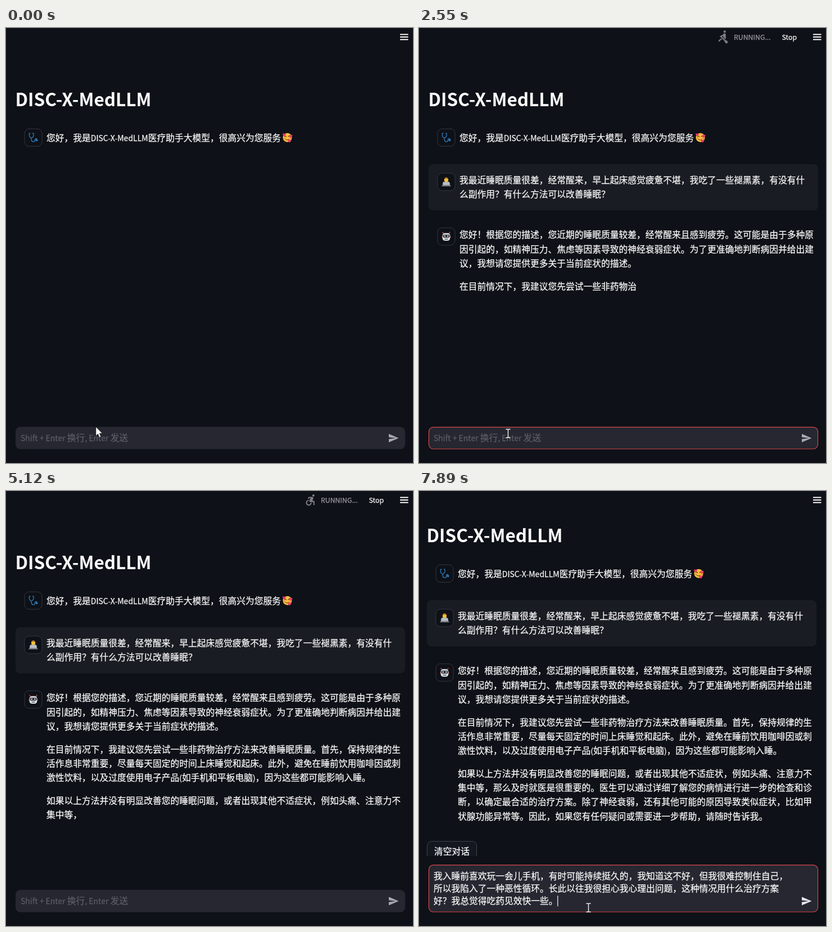
Recreate the animation shown at these times as an HTML page. Size 724 by 773 pixels, loop 8000 ms.

```html
<!DOCTYPE html>
<html lang="zh-CN">
<head>
<meta charset="utf-8">
<title>DISC-X-MedLLM</title>
<style>
  html, body { margin: 0; width: 100%; height: 100%; overflow: hidden; background: #0e1117; }
  svg { display: block; }
  text {
    font: 15.75px "Noto Sans CJK SC", "Noto Sans CJK", sans-serif;
    color: #fafafa; fill: currentColor; stroke: currentColor; stroke-width: .25;
    white-space: pre; text-spacing-trim: space-all; text-autospace: no-autospace;
  }
  .latin { font-size: .889em; }
  .title { font-size: 31.6px; font-weight: 700; stroke: none; }
  .small { font-size: 12.3px; }
  .avatar { fill: #0e1117; stroke: #343740; }
  .line { fill: none; stroke-linecap: round; stroke-linejoin: round; }
  .sport { fill: #7b7d83; }
  .wave { fill: none; stroke: #7b7d83; stroke-width: 2; }
</style>
</head>
<body>
<svg width="724" height="773" viewBox="0 0 724 773">
  <defs>
    <path id="heart" d="M0 3C-5-1-2.500-4 0-1.500 2.500-4 5-1 0 3z" fill="#f0356b"/>
    <rect id="frame" class="avatar" x="-15.500" y="-15.500" width="31" height="31" rx="8"/>
  </defs>
  <rect width="724" height="773" fill="#0e1117"/>

  <g id="content">
    <text class="title" x="16.500" y="138.600">DISC-X-MedLLM</text>

    <g transform="translate(48.500 194.700)">
      <use href="#frame"/>
      <g class="line" stroke="#2b78b5" stroke-width="1.400">
        <path d="M-5.500-7.500h-1.500c-.8 5 .5 7.500 3.500 8.500C0 0 1.300-2.500.5-7.500H-1M-3.500 1C-4 9 3 9 3 4.500 3 1 6 1 6 3"/>
        <circle cx="6" cy="4.500" r="1.400" fill="#2b78b5"/>
      </g>
    </g>
    <text id="greeting" x="72" y="200.500"></text>
    <g transform="translate(500.500 194.700)">
      <circle r="8" fill="#fcc13c"/>
      <path class="line" d="M-5-1.500q1.500-2 3 0M1.500-1.500q1.500-2 3 0M-3 3q3 3 5.500 0" stroke="#6b3c17" stroke-width="1.200"/>
      <circle cx="-5" cy="1.500" r="1.600" fill="#f58a4b"/><circle cx="5" cy="1.500" r="1.600" fill="#f58a4b"/>
      <use href="#heart" x="-5.500" y="-5"/><use href="#heart" x="6" y="-2.500"/><use href="#heart" x="4" y="6"/>
    </g>

    <g id="question">
      <rect x="17" y="242" width="693" height="82" rx="8" fill="#1a1c23"/>
      <g transform="translate(48.500 273.500)">
        <use href="#frame"/>
        <path d="M-7 4q1-5 7-5t7 5z" fill="#5f85a2"/>
        <circle cy="-3.500" r="3.700" fill="#fac236"/>
        <path d="M-3.700-4.500C-3-9.500 3-9.500 3.700-4.500L0-6z" fill="#a8702c"/>
        <path d="M-5.500 0h11l1 6h-13z" fill="#b9bec4"/>
        <path d="M-8 6H8v1.800H-8z" fill="#858b92"/>
      </g>
      <g id="asked"></g>
    </g>

    <g id="reply">
      <g transform="translate(48.500 370.500)">
        <use href="#frame"/>
        <path d="M-5-5.500L-6.500-7.500M5-5.500L6.500-7.500" class="line" stroke="#c9523f" stroke-width="1.400"/>
        <rect x="-8" y="-1.500" width="16" height="4" rx="1.500" fill="#b9473f"/>
        <rect x="-6.800" y="-6" width="13.600" height="13.500" rx="4.500" fill="#dfe3e6"/>
        <rect x="-6" y="-3.300" width="12" height="5.300" rx="2" fill="#2c2f38"/>
        <circle cx="-2.800" cy="-.7" r="1.300" fill="#d8e6ea"/><circle cx="2.800" cy="-.7" r="1.300" fill="#d8e6ea"/>
        <path d="M-2.500 4.800h5" class="line" stroke="#4c545c" stroke-width="1.500"/>
      </g>
      <g id="answer"></g>
    </g>

    <g id="clear">
      <rect x="17.500" y="670.500" width="88" height="36" rx="8" fill="#131720" stroke="#41444c"/>
      <text x="30" y="694">清空对话</text>
    </g>
  </g>

  <path d="M701 11.500h14.500M701 16h14.500M701 20.500h14.500" stroke="#fafafa" stroke-width="2"/>
  <g id="status">
    <g transform="translate(528.300 3.300) scale(1.030)">
      <g class="sport">
        <circle cx="15" cy="3" r="2"/>
        <path d="M8.500 14.500L4 19l1.500 1.500L9 17h2zM21 21l-3 3-3-3v-1.500l-7.100-7.100-.9.100v-2.200c1.700 0 3.600-.9 4.700-2l1.400-1.600q.7-.7 1.700-.7C16 6 17 7 17 8.300V14q0 1.300-.9 2.200l-3.600-3.600v-2.300q-1 .9-2.300 1.400l6.300 6.300H18z"/>
      </g>
      <g class="sport">
        <circle cx="18" cy="4.500" r="2"/>
        <path d="M15 17h-2a3 3 0 1 1-3-3v-2a5 5 0 1 0 5 5zM18 13.500h-1.900l1.700-3.700C18.400 8.500 17.400 7 16 7h-5.200q-1.300 0-1.900 1.200L8.200 10l1.900.5.700-1.500H13l-1.800 4.100c-.6 1.300.4 2.900 1.800 2.900h5v5h2v-5.500q0-2-2-2z"/>
      </g>
      <g class="sport">
        <circle cx="13.500" cy="3.500" r="2"/>
        <path d="M9.900 19.400l1-4.400 2.100 2v6h2v-7.500l-2.100-2 .6-3c1.300 1.500 3.300 2.500 5.500 2.500v-2c-1.900 0-3.500-1-4.300-2.400l-1-1.600q-.9-1.300-2.500-.9L6 8.300V13h2V9.600l1.800-.7L8.200 17l-4.900-1-.4 2z"/>
      </g>
      <g class="sport">
        <circle cx="16.500" cy="5.500" r="2.500"/>
        <path d="M10 8l-3.200 3.200q1 .8 1.900.8c1.300 0 1.400-1 3.300-1s2.100 1 3.400 1q.9 0 1.500-.6L10.500 5C9 3.500 7.500 3 5 3v2.500q2.500 0 4 1.500z"/>
        <path class="wave" d="M2 15.500c1.700 0 1.700-1 3.300-1s1.700 1 3.400 1 1.600-1 3.300-1 1.700 1 3.300 1 1.700-1 3.400-1 1.600 1 3.300 1M2 20c1.700 0 1.700-1 3.300-1s1.700 1 3.400 1 1.600-1 3.300-1 1.700 1 3.300 1 1.700-1 3.400-1 1.600 1 3.300 1"/>
      </g>
    </g>
    <text class="small" x="560" y="20.800" style="color:#989aa0">RUNNING...</text>
    <text class="small" x="645.500" y="20.800">Stop</text>
  </g>

  <rect id="cover" width="724" height="200" fill="#0e1117"/>
  <rect id="field" x="17.500" width="692" rx="8" fill="#262730" stroke-width="1.200"/>
  <text id="hint" x="26" y="734" style="color:#5a5c66"></text>
  <g id="typed"></g>
  <path id="caret" d="M0-15V4" stroke="#fafafa" stroke-width="1.200"/>
  <path id="send" transform="translate(679.300 718.800) scale(.833)" d="M2 21L23 12 2 3v7l15 2-15 2z"/>
  <path id="arrow" d="M160 709v15.500l3.600-3.300 2.600 6 2.500-1.100-2.600-5.800h4.900z" fill="#fff" stroke="#222" stroke-width=".5"/>
  <path id="beam" class="line" d="M-3.500-7.500h2.500l1 1 1-1h2.500M0-6.500v13M-3.500 7.500h2.500l1-1 1 1h2.500" stroke="#f4f4f4" stroke-width="1.400"/>
</svg>

<script>
const LOOP = 8000, STEP = 197.6, LEAD = 22;
const ASKED = [
  '我最近睡眠质量很差，经常醒来，早上起床感觉疲惫不堪，我吃了一些褪黑素，有没有什',
  '么副作用？有什么方法可以改善睡眠？'
];
const ANSWER = [
  [373.4, '您好！根据您的描述，您近期的睡眠质量较差，经常醒来且感到疲劳。这可能是由于多种原',
    '因引起的，如精神压力、焦虑等因素导致的神经衰弱症状。为了更准确地判断病因并给出建',
    '议，我想请您提供更多关于当前症状的描述。'],
  [464.6, '在目前情况下，我建议您先尝试一些非药物治疗方法来改善睡眠质量。首先，保持规律的生',
    '活作息非常重要，尽量每天固定的时间上床睡觉和起床。此外，避免在睡前饮用咖啡因或刺',
    '激性饮料，以及过度使用电子产品(如手机和平板电脑)，因为这些都可能影响入睡。'],
  [556, '如果以上方法并没有明显改善您的睡眠问题，或者出现其他不适症状，例如头痛、注意力不',
    '集中等，那么及时就医是很重要的。医生可以通过详细了解您的病情进行进一步的检查和诊',
    '断，以确定最合适的治疗方案。除了神经衰弱，还有其他可能的原因导致类似症状，比如甲',
    '状腺功能异常等。因此，如果您有任何疑问或需要进一步帮助，请随时告诉我。']
];
const FOLLOW_UP = [
  '我入睡前喜欢玩一会儿手机，有时可能持续挺久的，我知道这不好，但我很难控制住自己，',
  '所以我陷入了一种恶性循环。长此以往我很担心我心理出问题，这种情况用什么治疗方案',
  '好？我总觉得吃药见效快一些。'
];

const $ = id => document.getElementById(id);
const show = (el, on) => { el.style.display = on ? '' : 'none'; };
const markup = s => s.replace(/[\x20-\x7e]+/g, m => `<tspan class="latin">${m}</tspan>`);
const row = (s, x, y) => `<text x="${x}" y="${y}">${markup(s)}</text>`;

const lines = ANSWER.flatMap(([top, ...rows]) => rows.map((s, i) => ({ s, y: top + i * 25.2 })));
const total = lines.reduce((n, l) => n + l.s.length, 0);
const PACE = [[3, 0], [4, 10], [8, 62], [18, 178], [26, 262], [37, total]];
const firstLength = lines[0].s.length;

// Characters of the answer visible at a given step
function revealed(step) {
  if (step <= PACE[0][0]) return 0;
  const i = PACE.findIndex(([at]) => step <= at);
  if (i < 0) return total;
  const [a, from] = PACE[i - 1], [b, to] = PACE[i];
  return Math.round(from + (to - from) * (step - a) / (b - a));
}

function drawAnswer(count) {
  // A single line sits centred beside the avatar
  const drop = count <= firstLength ? 2.8 : 0;
  let left = count, html = '';
  for (const { s, y } of lines) {
    if (left <= 0) break;
    html += row(s.slice(0, left), 72, y + drop);
    left -= s.length;
  }
  $('answer').innerHTML = html;
}

function drawField(typed, focused, caretOn) {
  const extra = Math.max(typed.length - 1, 0) * 22.3;
  const top = 709.3 - extra;
  $('cover').setAttribute('y', top - 16);
  $('field').setAttribute('y', top);
  $('field').setAttribute('height', 748 - top);
  $('field').setAttribute('stroke', focused ? '#d8484d' : '#262730');
  $('send').setAttribute('fill', typed.length ? '#e2e5ea' : '#a6aab3');
  show($('hint'), !typed.length);
  $('typed').innerHTML = typed.map((s, i) => row(s, 26, 734 - (typed.length - 1 - i) * 22)).join('');
  const last = typed.length ? typed[typed.length - 1].length * 15.75 : 0;
  show($('caret'), caretOn);
  $('caret').setAttribute('transform', `translate(${26.3 + last} 734)`);
}

function draw(step) {
  const running = step >= 2 && step < 38, done = step >= 38;
  const between = (a, b) => step >= a && step <= b;

  $('content').setAttribute('transform', done ? 'translate(-3 -48)' : '');
  show($('question'), step >= 2);
  show($('reply'), step >= 3);
  show($('clear'), done);
  drawAnswer(revealed(step));

  show($('status'), running);
  const sport = Math.floor((step * STEP - LEAD + 2) % 800 / 200);
  document.querySelectorAll('.sport').forEach((el, i) => show(el, i === sport));

  const typed = step === 1 ? ASKED : step >= 40 ? FOLLOW_UP : [];
  const focused = between(1, 13) || step >= 39;
  drawField(typed, focused, typed.length > 0 || between(5, 7) || between(10, 12) || step === 39);

  show($('arrow'), step === 0);
  show($('beam'), focused);
  $('beam').setAttribute('transform', done ? 'translate(301.5 740.5)' : 'translate(158.5 720.5)');
}

$('greeting').innerHTML = markup('您好，我是DISC-X-MedLLM医疗助手大模型，很高兴为您服务');
$('hint').innerHTML = markup('Shift + Enter 换行, Enter 发送');
$('asked').innerHTML = ASKED.map((s, i) => row(s, 72, 276 + i * 25.2)).join('');

const start = performance.now();
let shown = -1;
function tick() {
  const t = (performance.now() - start) % LOOP;
  const step = Math.floor((t + LEAD) / STEP);
  if (step !== shown) draw(shown = step);
  requestAnimationFrame(tick);
}
tick();
</script>
</body>
</html>
```
